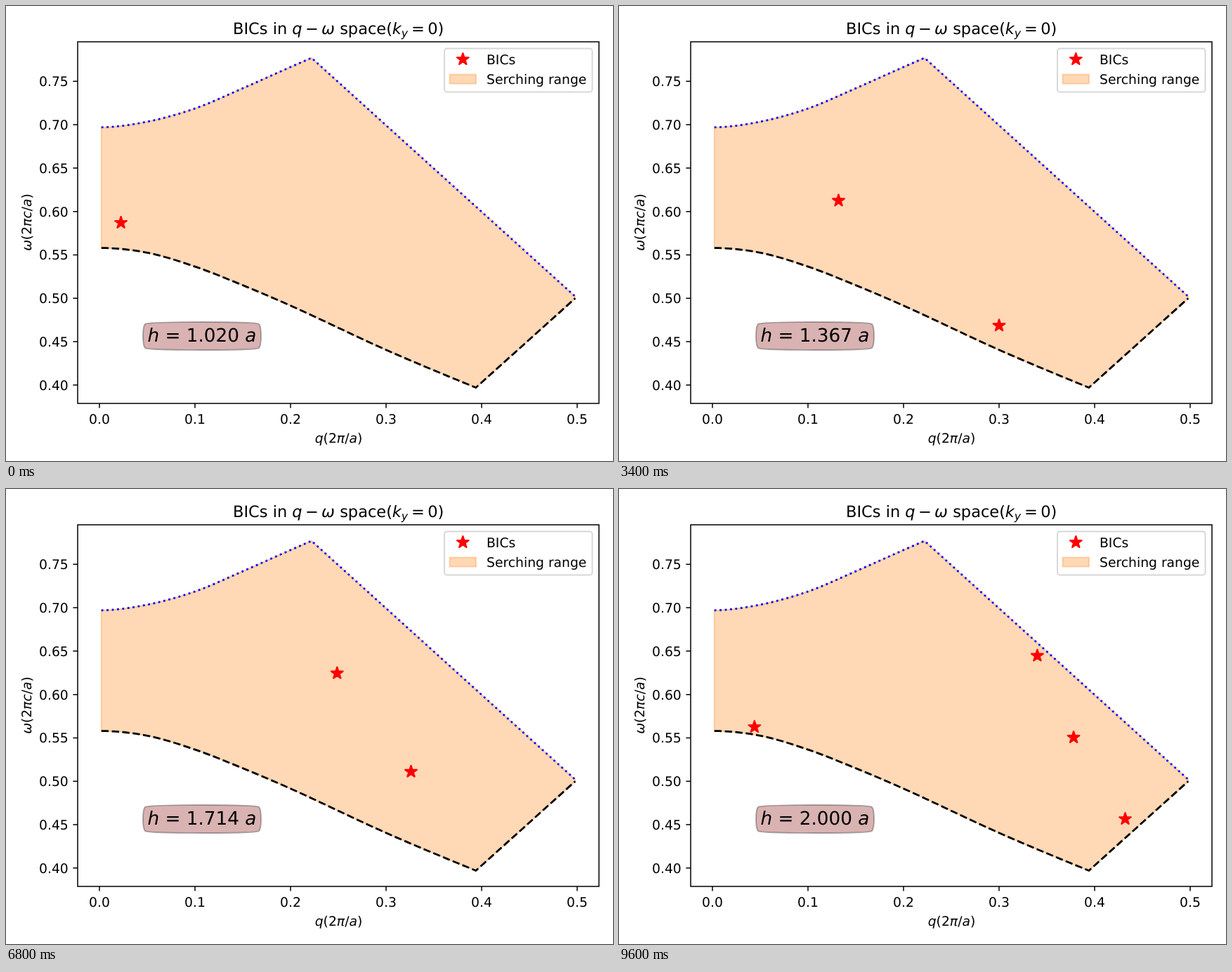
Recreate the animation shown at these times as an HTML page. Size 864 by 648 pixels, loop 9.8 s.

```html
<!DOCTYPE html>
<html lang="en">
<head>
<meta charset="utf-8">
<title>BICs in q-ω space</title>
<style>
html, body { margin: 0; width: 100%; height: 100%; overflow: hidden; background: #fff; }
svg { display: block; width: 864px; height: 648px; }
text { font: 18.75px "DejaVu Sans", sans-serif; white-space: pre; text-rendering: geometricPrecision; }
.title text { font-size: 22.5px; }
.title .sub { font-size: 15.75px; }
.label { font-size: 26.25px; }
i, .it { font-style: italic; }
.mid { text-anchor: middle; }
.end { text-anchor: end; }
.axes { fill: none; stroke: #000; stroke-width: 1.5; }
.area { fill: #ff7f0e; stroke: #ff7f0e; stroke-width: 1.875; fill-opacity: .3; stroke-opacity: .3; }
.line { fill: none; stroke-width: 2.81; stroke-linejoin: round; }
.star { fill: red; stroke: red; stroke-width: 1.875; stroke-linejoin: bevel; }
</style>
</head>
<body>
<svg viewBox="0 0 864 648">
  <defs><path id="star" class="star"/></defs>
  <path id="area" class="area"/>
  <path id="low" class="line" stroke="#000" stroke-dasharray="10.4 4.5"/>
  <path id="high" class="line" stroke="#00f" stroke-dasharray="2.81 4.64"/>
  <g id="stars"></g>
  <path id="axes" class="axes" d="M102 51H844V566H102Z"/>
  <g id="ticks"></g>

  <g class="title">
    <text x="323" y="40">BICs in </text>
    <text x="407.2" y="40" class="it">q</text>
    <text x="425.9" y="40">−</text>
    <text x="449" y="40" class="it">ω</text>
    <text x="468" y="40"> space(</text>
    <text x="549.7" y="40" class="it">k</text>
    <text x="562.8" y="43.6" class="it sub">y</text>
    <text x="577" y="40">=</text>
    <text x="600.3" y="40">0</text>
    <text x="614.6" y="40">)</text>
  </g>
  <text x="473.5" y="622" class="mid"><tspan class="it">q</tspan>(2<tspan class="it">π</tspan>/<tspan class="it">a</tspan>)</text>
  <text transform="translate(35.5 308) rotate(-90)" class="mid"><tspan class="it">ω</tspan>(2<tspan class="it">πc</tspan>/<tspan class="it">a</tspan>)</text>

  <path d="M198 453C202 449 356 449 360 453C364 457 364 483 360 487C356 491 202 491 198 487C194 483 194 457 198 453Z"
        fill="#d9b2b2" stroke="#000" stroke-opacity=".3" stroke-width="1.875"/>
  <text x="201.5" y="478" class="label"><tspan class="it">h</tspan> = <tspan id="height">1.020</tspan> <tspan class="it">a</tspan></text>

  <rect x="624" y="60.5" width="210.5" height="62" rx="3.75" fill="#fff" fill-opacity=".8"
        stroke="#ccc" stroke-opacity=".8" stroke-width="1.875"/>
  <use href="#star" x="650.3" y="76"/>
  <rect x="631.5" y="97.5" width="37.5" height="13.1" class="area"/>
  <text x="684" y="82.5">BICs</text>
  <text x="684" y="111">Serching range</text>
</svg>
<script>
const FRAMES = 49, STEP = 200;
const $ = id => document.getElementById(id);
const px = q => 133 + 1360 * q;
const py = w => 107.3 + (0.75 - w) * 1235.7;
const height = i => 1 + (i + 1) / FRAMES;

function add(parent, tag, attrs, text = '') {
  const el = document.createElementNS('http://www.w3.org/2000/svg', tag);
  for (const k in attrs) el.setAttribute(k, attrs[k]);
  el.textContent = text;
  return parent.appendChild(el);
}

// Cubic Hermite curve through [x, y] points, linear beyond the ends.
function spline(p) {
  const n = p.length - 1;
  const d = p.slice(1).map((b, k) => (b[1] - p[k][1]) / (b[0] - p[k][0]));
  const m = p.map((_, k) => k && k < n ? (d[k - 1] + d[k]) / 2 : 0);
  m[0] = n > 1 ? 1.5 * d[0] - 0.5 * m[1] : d[0];
  m[n] = n > 1 ? 1.5 * d[n - 1] - 0.5 * m[n - 1] : d[0];
  return x => {
    if (x <= p[0][0]) return p[0][1] + m[0] * (x - p[0][0]);
    if (x >= p[n][0]) return p[n][1] + m[n] * (x - p[n][0]);
    let k = 0;
    while (x > p[k + 1][0]) k++;
    const s = p[k + 1][0] - p[k][0], t = (x - p[k][0]) / s, r = 1 - t;
    return r * r * (1 + 2 * t) * p[k][1] + t * t * (3 - 2 * t) * p[k + 1][1]
      + s * t * r * (r * m[k] - t * m[k + 1]);
  };
}

// Search region
const lowCurve = spline([[-.05, .5525], [0, .558], [.05, .5525], [.1, .5365], [.15, .515],
  [.2, .4915], [.3, .4405], [.394, .397]]);
const highCurve = spline([[-.05, .7035], [0, .697], [.05, .7035], [.1, .7187], [.15, .742],
  [.2, .7665], [.222, .777]]);

function edge(curve, turn, end) {
  const pts = [];
  for (let k = 0; k <= 80; k++) {
    const q = .002 + (turn - .002) * k / 80;
    pts.push([q, curve(q)]);
  }
  pts.push([.498, end]);
  return pts.map(([q, w]) => px(q).toFixed(2) + ' ' + py(w).toFixed(2));
}
const low = edge(lowCurve, .394, .5), high = edge(highCurve, .222, .502);
$('low').setAttribute('d', 'M' + low.join('L'));
$('high').setAttribute('d', 'M' + high.join('L'));
$('area').setAttribute('d', 'M' + high.concat([...low].reverse()).join('L') + 'Z');

// Axes
let marks = $('axes').getAttribute('d');
for (let k = 0; k <= 5; k++) {
  const x = px(k / 10);
  marks += `M${x} 566v6.6`;
  add($('ticks'), 'text', { x, y: 594.8, class: 'mid' }, (k / 10).toFixed(1));
}
for (let k = 8; k <= 15; k++) {
  const y = py(k / 20);
  marks += `M102 ${y}h-6.6`;
  add($('ticks'), 'text', { x: 88.8, y: y + 7, class: 'end' }, (k / 20).toFixed(2));
}
$('axes').setAttribute('d', marks);

// Five-pointed star
$('star').setAttribute('d', 'M' + Array.from({ length: 10 }, (_, k) => {
  const r = k % 2 ? 3.58 : 9.375, a = k * Math.PI / 5;
  return (r * Math.sin(a)).toFixed(2) + ' ' + (-r * Math.cos(a)).toFixed(2);
}).join('L') + 'Z');

// Each branch: first step, last step, knots [step, q, ω].
// q² and ω·h are close to linear in h.
const branches = [
  [0, 31, [[0, .0225, .587], [10, .23, .5063], [17, .3, .4685], [22, .342, .4468], [29, .3963, .4207]]],
  [14, 48, [[14, .002, .637], [17, .132, .6125], [22, .21, .5765], [29, .286, .535], [38, .356, .494], [48, .432, .4565]]],
  [24, 48, [[29, .18, .6585], [38, .292, .6005], [48, .378, .5505]]],
  [35, 48, [[38, .212, .7127], [48, .34, .6447]]],
  [48, 48, [[47, .002, .57], [48, .044, .5625]]]
].map(([from, to, knots]) => ({
  from, to,
  q2: spline(knots.map(([i, q]) => [height(i), q * q])),
  wh: spline(knots.map(([i, , w]) => [height(i), w * height(i)])),
  el: add($('stars'), 'use', { href: '#star' })
}));

let shown = -1;
function draw(i) {
  const h = height(i);
  $('height').textContent = h.toFixed(3);
  for (const b of branches) {
    const on = i >= b.from && i <= b.to;
    b.el.setAttribute('visibility', on ? 'visible' : 'hidden');
    if (!on) continue;
    b.el.setAttribute('x', px(Math.sqrt(Math.max(0, b.q2(h)))));
    b.el.setAttribute('y', py(b.wh(h) / h));
  }
}

const start = performance.now();
function tick() {
  const i = Math.floor((performance.now() - start) / STEP) % FRAMES;
  if (i !== shown) draw(shown = i);
  requestAnimationFrame(tick);
}
tick();
</script>
</body>
</html>
```
